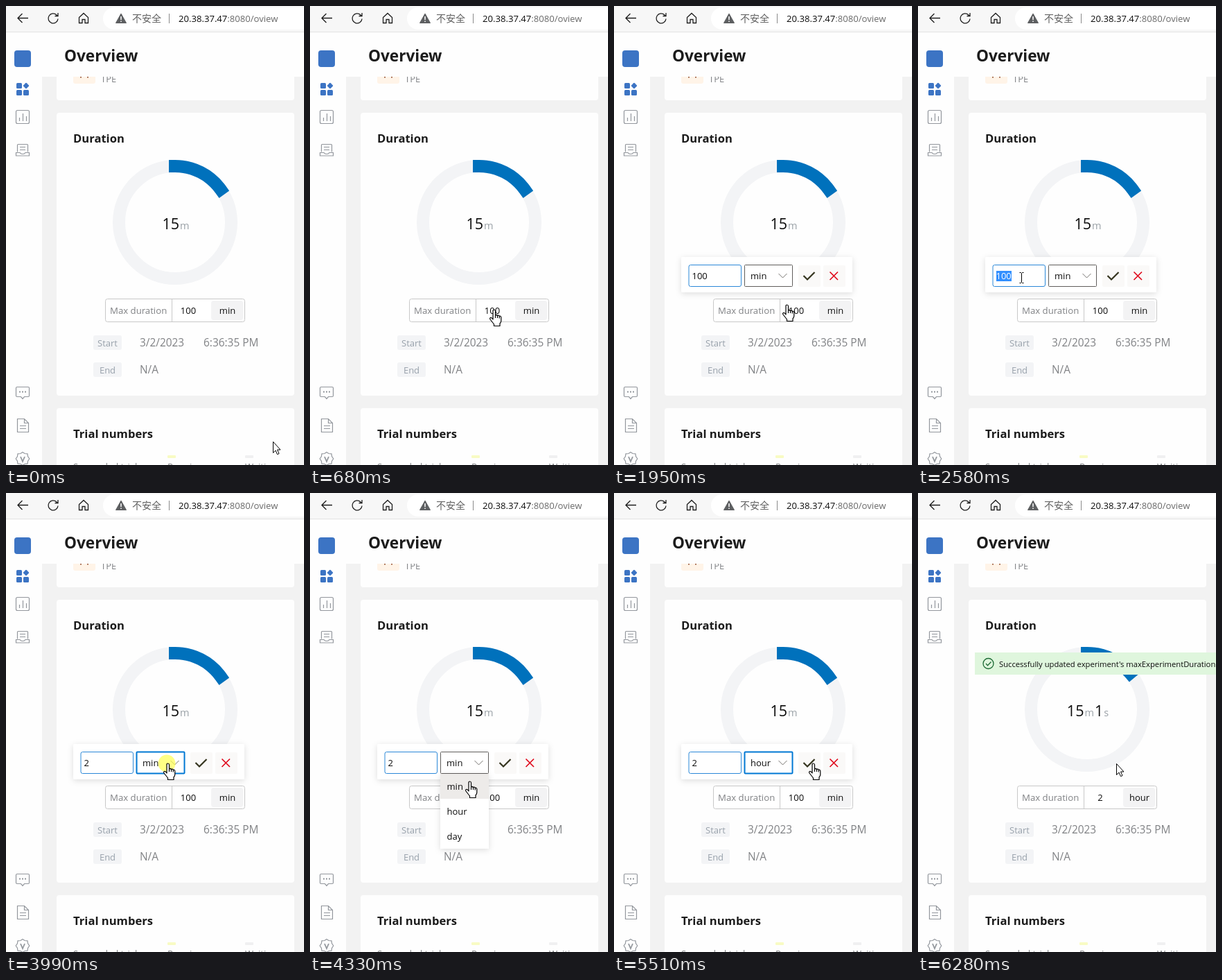
An HTML page that plays this animation: 430x662 px, repeating every 6.35 s.

```html
<!DOCTYPE html>
<html lang="en">
<head>
<meta charset="utf-8">
<title>Overview</title>
<style>
html, body { margin: 0; width: 100%; height: 100%; overflow: hidden; background: #f2f2f2; }
svg { display: block; }
text { font: 13px "Open Sans", "Noto Sans", sans-serif; fill: #0c0c0c; }
.line { fill: none; stroke-width: 1.3; }
.nav { stroke: #93979d; stroke-width: 1.2; }
.muted, .muted text { fill: #808285; }
.pale { fill: #97a0aa; }
.title { font-weight: 700; font-size: 16.6px; fill: #1c1c1c; }
.card { fill: #fefefe; }
.date text { font-size: 15.4px; }
.mid { text-anchor: middle; }
.small { font-size: 14.5px; fill: #99a0a6; }
</style>
</head>
<body>
<svg width="430" height="662" viewBox="0 0 430 662">
  <defs>
    <filter id="soft" x="-20%" y="-30%" width="140%" height="170%">
      <feDropShadow dx="0" dy="2" stdDeviation="4" flood-opacity=".13"/>
    </filter>
  </defs>

  <rect width="430" height="662" fill="#f2f2f2"/>
  <!-- cards -->
  <g class="card">
    <rect x="73" y="80" width="343" height="56" rx="4"/>
    <rect x="73" y="154" width="343" height="408" rx="4"/>
    <rect x="73" y="580" width="343" height="100" rx="4"/>
  </g>
  <rect x="97" y="90" width="32" height="22" rx="3" fill="#fff4e8"/>
  <path d="M107 102.5h2M117 102.5h2" stroke="#9c5a3c" stroke-width="2"/>
  <text class="muted" x="137" y="110">TPE</text>

  <!-- page header and sidebar -->
  <path d="M0 38H430V102H52V662H0Z" fill="#fefefe"/>
  <text class="title" x="84" y="80" style="font-size:22.6px">Overview</text>
  <rect x="12" y="64" width="24" height="24" rx="4" fill="#3c74c4"/>
  <g fill="#3c74c4">
    <rect x="15" y="111" width="8" height="8" rx="1.5"/>
    <rect x="15" y="121" width="8" height="8" rx="1.5"/>
    <rect x="25" y="121" width="8" height="8" rx="1.5"/>
    <rect x="25.7" y="111.7" width="6.6" height="6.6" rx="1.2" transform="rotate(45 29 115)"/>
  </g>
  <g class="line nav">
    <rect x="14.5" y="150.5" width="19" height="19" rx="2"/>
    <path d="M19.5 166v-5M24.5 166v-11M29.5 166v-7"/>
    <path d="M16.5 210.5v-10q0-1 1-1h13q1 0 1 1v10M20 203.5h8M20 207.5h8M14.5 211.5h5.5q1 2 4 2t4-2h5.5v4.5h-19z"/>
    <path d="M16 549.5h16q1.5 0 1.5 1.5v11q0 1.5-1.5 1.5h-5.5l-2.5 3-2.5-3H16q-1.5 0-1.5-1.5v-11q0-1.5 1.5-1.5z"/>
    <path d="M19 556.5h2M23 556.5h2M27 556.5h2" stroke-width="2"/>
    <path d="M16.5 595.5h10l6 6v13h-16zM26.5 595.5v6h6M20 605.5h9M20 609.5h9"/>
    <path d="M24 643.5l3 2 4 .3 .6 4 2.2 3.2-2.2 3.2-.6 4-4 .3-3 2-3-2-4-.3-.6-4-2.2-3.2 2.2-3.2 .6-4 4-.3z"/>
    <path d="M21 650l3 7 3-7" stroke-width="1.8"/>
  </g>

  <!-- browser bar -->
  <rect width="430" height="37" fill="#f7f7f7"/>
  <path d="M0 37.5H430" stroke="#e3e3e3"/>
  <rect x="140" y="2" width="320" height="32" rx="16" fill="#fff"/>
  <g class="line" stroke="#1e1e1e">
    <path d="M32 17.5H17M23.5 11l-6.5 6.5 6.5 6.5"/>
    <path d="M75 18.5a7 7 0 1 1-2-5.5l1.5 1.5M75 10v4.5h-4.5"/>
    <path d="M105.5 16.5l6.5-6 6.5 6v8h-4.5v-5h-4v5h-4.5z"/>
  </g>
  <path d="M166 11l7.5 13.5h-15z" fill="#5d5f61" stroke="#5d5f61" stroke-linejoin="round"/>
  <path d="M166 15v5M166 21.5v1.5" stroke="#fff" stroke-width="1.5"/>
  <text x="182" y="23" style="font:14px 'Noto Sans CJK SC','Noto Sans CJK',sans-serif;fill:#606060">不安全</text>
  <path d="M235.5 11v14" stroke="#8a8a8a"/>
  <text x="249" y="23" style="font-size:13.1px">20.38.37.47<tspan fill="#6a6a6a">:8080/oview</tspan></text>

  <!-- duration card -->
  <text class="title" x="97" y="197">Duration</text>
  <g fill="none" stroke-width="18" transform="rotate(-90 244 312)">
    <circle cx="244" cy="312" r="81" stroke="#f3f4f6"/>
    <circle id="arc" cx="244" cy="312" r="81" pathLength="360" stroke="#0071bc" stroke-linecap="square"/>
  </g>
  <text id="clock" class="mid" x="245" y="322" style="font-size:21.5px"></text>
  <rect x="143.5" y="422.5" width="201" height="33" rx="3" fill="#fff" stroke="#c8c8c8"/>
  <path d="M239.5 423v32" stroke="#c8c8c8"/>
  <rect x="296" y="425" width="46" height="28" rx="4" fill="#f3f3f4"/>
  <text class="muted" x="150" y="444" style="font-size:13.2px">Max duration</text>
  <text id="max" class="mid" x="263" y="444"></text>
  <text id="unit" class="mid" x="319.5" y="444"></text>
  <g fill="#f3f4f6">
    <rect x="126" y="475" width="41" height="21" rx="3"/>
    <rect x="126" y="514" width="41" height="21" rx="3"/>
  </g>
  <text class="pale mid" x="146.5" y="491">Start</text>
  <text class="pale mid" x="146.5" y="530">End</text>
  <g class="muted date">
    <text x="193" y="491">3/2/2023</text>
    <text x="285" y="491">6:36:35 PM</text>
    <text x="193" y="530">N/A</text>
  </g>

  <!-- trial card -->
  <text class="title" x="97" y="623">Trial numbers</text>
  <rect x="233" y="648" width="12" height="4" rx="1" fill="#f8fbc4"/>
  <rect x="345" y="648" width="12" height="4" rx="1" fill="#f0f0f1"/>
  <g class="muted">
    <text x="97" y="669">Succeeded trial</text>
    <text x="233" y="669">Running</text>
    <text x="345" y="669">Waiting</text>
  </g>

  <!-- edit popup -->
  <g id="popup">
    <rect x="97" y="362" width="247" height="51" rx="2" fill="#fff" filter="url(#soft)"/>
    <rect x="108" y="373.5" width="75.5" height="31" rx="2.5" fill="#fff" stroke="#2b88d8"/>
    <rect id="mark" x="113" y="382" width="22" height="15" fill="#3390ff"/>
    <text id="field" x="112.5" y="394"></text>
    <path id="caret" d="M121.5 382v15" stroke="#222"/>
    <rect id="select" x="188.5" y="373.5" width="69" height="31" rx="1" fill="#fff"/>
    <text id="choice" x="197" y="394"></text>
    <path class="line" d="M237.5 386l6 6 6-6" stroke="#75736f" style="stroke-width:1"/>
    <rect x="266" y="374" width="32" height="31" rx="2" fill="#faf9f8"/>
    <rect x="302" y="374" width="32" height="31" rx="2" fill="#faf9f8"/>
    <path id="tick" class="line" d="M273.5 389l5.5 5.5 10.5-10.5" style="stroke-width:2.2"/>
    <path class="line" d="M311.5 383.5l11.5 11.5M323 383.5l-11.5 11.5" stroke="#e00b1c" style="stroke-width:1.7"/>
  </g>
  <g id="menu">
    <rect x="188" y="405" width="70" height="108" fill="#fff" filter="url(#soft)"/>
    <rect x="188" y="405" width="70" height="36" fill="#edebe9"/>
    <rect id="hover" x="188" y="441" width="70" height="36" fill="#f3f2f1"/>
    <text x="197.5" y="428">min</text>
    <text x="197.5" y="464">hour</text>
    <text x="197.5" y="500">day</text>
  </g>

  <g id="toast">
    <rect x="82" y="230" width="348" height="32" fill="#dff6dd"/>
    <g class="line" stroke="#1d6b35">
      <circle cx="101.5" cy="246" r="7.5"/>
      <path d="M98 246l2.500 2.7 5-5.2"/>
    </g>
    <text x="117" y="250.5" style="font-size:11.23px">Successfully updated experiment's maxExperimentDuration</text>
  </g>

  <!-- pointer -->
  <g id="pointer" stroke="#000" fill="#fff" stroke-linejoin="round">
    <circle id="glow" r="12.5" fill="#ffff50" fill-opacity=".7" stroke="none"/>
    <path id="arrow" d="M.5 .5V16.500L4 13L6.5 18.700L9 17.600L6.5 12H11Z"/>
    <path id="hand" stroke-width="1.2" d="M0 14V2Q0 0 1.7 0T3.5 2V8Q5 6.8 6.5 8.5Q8 7.6 9.3 9.3Q11.8 8.8 11.8 11.5V16Q11.8 18 10 20V23.5H1.5V21L-4 14Q-5 12 -3.5 11.5Q-2 11 0 14ZM3.5 8V12M6.5 8.5V12M9.3 9.3V12.5"/>
    <path id="beam" fill="none" d="M-3.5-7.5H-1.5L-.5-6.5L.5-7.5H2.5M-.5-6.5V6.5M-3.5 7.5H-1.5L-.5 6.5L.5 7.5H2.5"/>
  </g>
</svg>
<script>
const LOOP = 6350;
const $ = id => document.getElementById(id);
const show = (id, on) => $(id).style.display = on ? '' : 'none';
const between = (t, a, b) => t >= a && t < b;
const small = s => `<tspan class="small" dx="1">${s}</tspan>`;

// start, end, steps, target x, target y
const moves = [
  [70, 680, 10, 264, 438],
  [1950, 2360, 7, 150, 392],
  [3650, 3850, 4, 232, 390],
  [4200, 4610, 7, 225, 450],
  [4680, 4750, 2, 225, 455],
  [4960, 5510, 9, 286, 390],
];
const clicks = [[820, 960], [2500, 2580], [3990, 4050], [4890, 4960], [5720, 5850]];

function pointerAt(t) {
  let x = 385, y = 628;
  for (const [a, b, n, tx, ty] of moves) {
    if (t < a) break;
    const step = Math.floor((t - a) / (b - a) * (n - 1) + .2) + 1;
    const u = Math.min(1, step / n);
    x += (tx - x) * u;
    y += (ty - y) * u;
  }
  return [x, y];
}

function slideIn(id, t, start, length, shift) {
  const rest = (1 - Math.min(1, Math.max(0, (t - start) / length))) ** 4;
  $(id).setAttribute('transform', `translate(0 ${shift * rest})`);
  $(id).setAttribute('opacity', 1 - rest * rest);
}

function draw(t) {
  const done = t >= 6210;
  const popup = between(t, 930, 6210);
  const menu = between(t, 4050, 4960);
  const marked = between(t, 2500, 3510);
  const focus = between(t, 3990, 4050) || between(t, 4960, 5720);

  show('popup', popup);
  slideIn('popup', t, 930, 360, 10);
  show('mark', marked);
  show('caret', between(t, 3510, 3990));
  $('field').textContent = t < 3510 ? '100' : '2';
  $('field').style.fill = marked ? '#fff' : '';
  $('choice').textContent = t < 4960 ? 'min' : 'hour';
  $('select').setAttribute('stroke', focus ? '#0078d4' : '#605e5c');
  $('select').setAttribute('stroke-width', focus ? 2 : 1);
  $('tick').setAttribute('stroke', t < 1290 ? '#1c701c' : '#35351f');

  const [x, y] = pointerAt(t);
  show('menu', menu);
  slideIn('menu', t, 4050, 300, -8);
  show('hover', y > 441);

  show('toast', done);
  const angle = done ? 54 - 9 * Math.min(1, (t - 6190) / 200) : 54;
  $('arc').setAttribute('stroke-dasharray', `${angle} 400`);
  $('clock').innerHTML = '15' + small('m') + (t >= 6280 ? '<tspan dx="1">1</tspan>' + small('s') : '');
  $('max').textContent = done ? '2' : '100';
  $('unit').textContent = done ? 'hour' : 'min';

  const inBox = x > 143 && x < 345 && y > 422 && y < 456;
  const inPopup = popup && y > 362 && y < 413;
  const beam = inPopup && x < 184;
  const hand = !beam && (menu || inBox || inPopup && x > 188);
  show('beam', beam);
  show('hand', hand);
  show('arrow', !beam && !hand);
  show('glow', clicks.some(([a, b]) => between(t, a, b)));
  $('pointer').setAttribute('transform', `translate(${Math.round(x)} ${Math.round(y)})`);
}

const begin = performance.now();
function tick() {
  draw((performance.now() - begin) % LOOP);
  requestAnimationFrame(tick);
}
tick();
</script>
</body>
</html>
```
